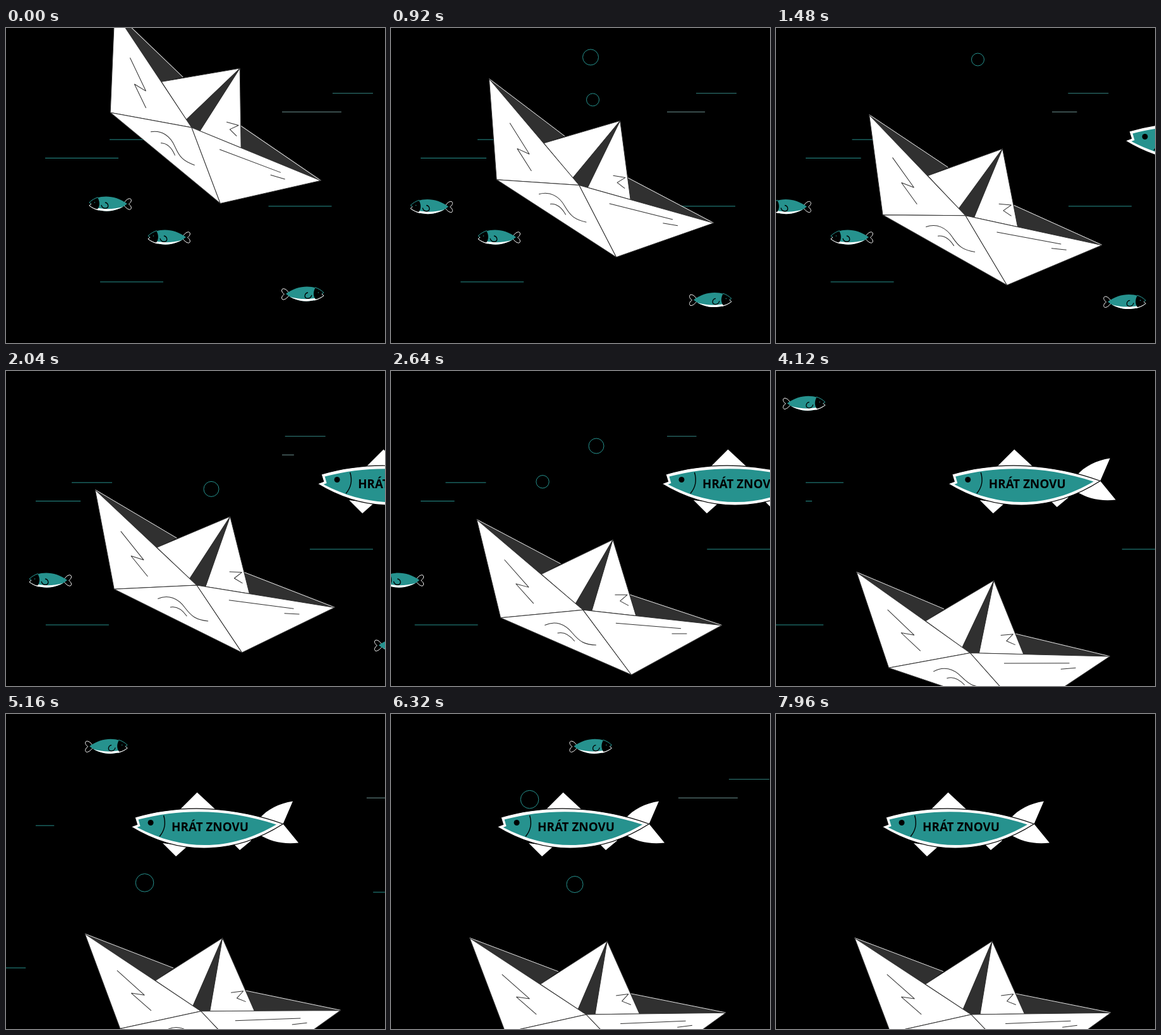
An HTML page with a canvas for the animation above (8000 ms loop, 600 by 500 pixels).

```html
<!DOCTYPE html>
<html lang="cs">
<head>
<meta charset="utf-8">
<title>Lodička</title>
<style>
html, body { margin: 0; width: 100%; height: 100%; overflow: hidden; background: #000; }
canvas { display: block; width: 600px; height: 500px; }
</style>
</head>
<body>
<canvas id="stage" width="600" height="500"></canvas>
<script>
const ctx = document.getElementById('stage').getContext('2d');
const TEAL = '#26928e', DARK = '#303030', LOOP = 8;

function path(d, fill, stroke, width = 1) {
  const p = new Path2D(d);
  if (fill) { ctx.fillStyle = fill; ctx.fill(p); }
  if (stroke) { ctx.strokeStyle = stroke; ctx.lineWidth = width; ctx.stroke(p); }
}

function dot(x, y, r, color) {
  ctx.fillStyle = color;
  ctx.beginPath();
  ctx.arc(x, y, r, 0, Math.PI * 2);
  ctx.fill();
}

// Horizontal ripple, cut off at its left limit
function ripple(y, x, length, limit, color = TEAL) {
  const from = Math.max(x, limit), to = Math.min(x + length, 600);
  if (to <= from) return;
  ctx.fillStyle = color;
  ctx.fillRect(from, y, to - from, 1);
}

function ripples(t) {
  const late = t > 4.5, run = 100 * (t - 5.16);
  ripple(103.1, late ? 651 - run : 517 - 36.9 * t, 64, 437, '#348380');
  ripple(132.7, late ? 571 - run : 437 - 36.8 * t, 94, 437, '#6f9694');
  ripple(176.6, 164 - 29.4 * t, 64, 47);
  ripple(206, 62 - 29.35 * t, 116, 47);
  ripple(282.4, 415.5 + 32.1 * t, 100, 0);
  ripple(402.5, 149 - 42.2 * t, 100, 0);
}

// x, y, radius, time at that place, start and end of life
const BUBBLES = [
  [316, 46.5, 12.5, 0.92, 0, 1.6],
  [319.5, 114, 10, 0.92, 0, 2.02],
  [325, 187.5, 12, 2.04, 0.9, 2.88],
  [240, 107.5, 10.2, 3.24, 2.06, 3.86],
  [219.5, 268, 14.3, 5.16, 4, 6.4],
  [291, 225, 13, 6.72, 5.2, 7.5]
];

function bubbles(t) {
  ctx.strokeStyle = TEAL;
  ctx.lineWidth = 1;
  for (const [x, y, r, at, from, to] of BUBBLES) {
    if (t < from || t > to) continue;
    ctx.beginPath();
    ctx.arc(x, y - 114 * (t - at), r, 0, Math.PI * 2);
    ctx.stroke();
  }
}

// x is the left edge; the shape looks left unless flipped
function smallFish(x, y, flip) {
  if (x < -70 || x > 602) return;
  ctx.save();
  ctx.translate(flip ? x + 67 : x, y);
  if (flip) ctx.scale(-1, 1);
  path('M54 1 C57 -6 62 -9 65 -8 C68 -6 66 -2 62.5 0.5 C66 3 68 7 65 9 C62 10 57 6 54 1', '#000', '#fff');
  const body = 'M0 -2 C14 -15 40 -15 60 0 C42 15 16 15 0 3 L3 0 Z';
  path(body, TEAL);
  ctx.save();
  ctx.clip(new Path2D(body));
  path('M0 4 C18 8 32 11 56 4 L50 14 L0 14 Z', '#fff');
  path('M0 -3 C3 -7 8 -9 13 -10 C17 -4 17 4 13 8.5 C8 8 3 5 0 2.5 L3 0 Z', '#000');
  ctx.restore();
  path('M3 0 L0 -2 C4 -6 9 -9 14 -10.3', null, TEAL);
  path('M3 0 L0 3 C5 7 10 9 15 10.2', null, '#fff');
  path('M19 2 C20 6 23 8 27 7 C31 6 31 -1 25 -2', null, '#000', 1.3);
  dot(8.5, -2, 0.8, TEAL);
  ctx.restore();
}

function shoal(t) {
  const after = Math.max(0, t - 0.92);
  const first = t < 0.92 ? 132 - 168.6 * t + 64 * t * t : 31 - 50 * after - 45 * after * after;
  smallFish(first, 279 + 4.5 * Math.min(1, t / 0.92));
  smallFish(225 - 96.5 * t + 2.15 * t * t, 332);
  const rest = Math.max(0, 1 - t / 2);
  smallFish(436 + 12 * t + 29.4 * t * t, 435.3 - 13.3 * rest * rest, true);
  const u = t - 5.16;
  smallFish(125 + 110 * u + (u > 0 ? 22 * u * u : 0), 51.3, true);
}

function label(text, x, y, width) {
  const face = s => `bold extra-condensed ${s}px "Open Sans", "Noto Sans", sans-serif`;
  ctx.font = face(27);
  const size = Math.min(27, 27 * width / ctx.measureText(text).width);
  ctx.font = face(size);
  ctx.fillStyle = '#000';
  ctx.textAlign = 'center';
  ctx.textBaseline = 'alphabetic';
  ctx.fillText(text, x, y + size * 0.36);
}

// Steady swim, then an even slow-down
function swim(t) {
  const speed = 107, brake = 3.8, slow = 2.56;
  if (t < brake) return speed * (slow / 2 + brake - t);
  const left = Math.max(0, brake + slow - t);
  return speed * left * left / (2 * slow);
}

function bigFish(t) {
  const x = swim(t);
  if (x > 440) return;
  ctx.save();
  ctx.translate(x, 0);
  path('M272.5 124.5 L246 151 H301 Z', '#fff');
  path('M218 205 L239 226 L257 210 Z', '#fff');
  path('M328 204 L340 216 L358 201 L357 196 Z', '#fff');
  path('M371 166 C384 151 402 142 424 138.5 L408.5 174.5 L433 204.5 C410 207 388 203 371 191 Z', '#fff');
  path('M174 164 C248 142 332 147 408.5 174.5 C336 221 250 229 168 179 L177.5 175.5 Z', '#fff', '#000', 1.2);
  path('M179.5 167.5 C250 149 325 151 398 175.5 C332 214 258 222 177.5 180 L182.5 178 Z', TEAL);
  dot(199, 172.5, 4.5, '#000');
  path('M219.5 161 C223.5 174 221 185 213 194.5', null, '#000', 1.4);
  label('HRÁT ZNOVU', 293, 179.7, 122);
  ctx.restore();
}

function boat(t) {
  const left = Math.max(0, 1 - t / 5.92), p = left * left;
  ctx.save();
  ctx.translate(309 - 17.2 * p + 2.2 * p * p, 477 - 319 * p);
  ctx.rotate((23.1 * p - 0.7) * Math.PI / 180);
  ctx.lineJoin = 'bevel';
  // inner sides
  path('M-183 -123.7 L-43.2 -68.5 L-72 -49 Z', DARK);
  path('M71 -32 L221 0 H84.5 Z', DARK);
  path('M-183 -123.9 L-43.2 -68.8 M71 -32.3 L221 -0.3', null, '#fff', 0.9);
  // sail
  path('M-72 -49 L34.6 -116 L-12.9 -8.2 Z', '#fff', DARK);
  path('M34.6 -116 L14 0 H84.5 Z', '#fff', DARK);
  path('M34.6 -116 L-12.9 -8.2 L0 0 H14 Z', DARK);
  // hull
  path('M-183 -123.7 L-128.2 27 L0 0 Z', '#fff', DARK);
  path('M-128.2 27 L0 0 L87.7 94 Z', '#fff', DARK);
  path('M0 0 H221 L87.7 94 Z', '#fff', DARK);
  // pen marks
  path('M-132.5 -65.3 L-89.2 -26 L-110.2 -29.3 L-78.8 -1.2', null, DARK);
  path('M47.6 -29.3 L67.2 -31.6 L56.8 -20.4 L71 -14.7', null, DARK);
  path('M-57.5 31 C-42 21.5 -26 25 -12.5 38.5 C0 50.5 8 54.5 27 53.3', null, DARK);
  path('M-36 41.2 C-25 37 -16 42.5 -7.6 51', null, DARK);
  path('M54 15.2 L157.5 12.2 M144 22 L167.7 19.4', null, DARK);
  ctx.restore();
}

function draw() {
  const t = performance.now() / 1000 % LOOP;
  ctx.fillStyle = '#000';
  ctx.fillRect(0, 0, 600, 500);
  ripples(t);
  bubbles(t);
  shoal(t);
  bigFish(t);
  boat(t);
  requestAnimationFrame(draw);
}
draw();
</script>
</body>
</html>
```
